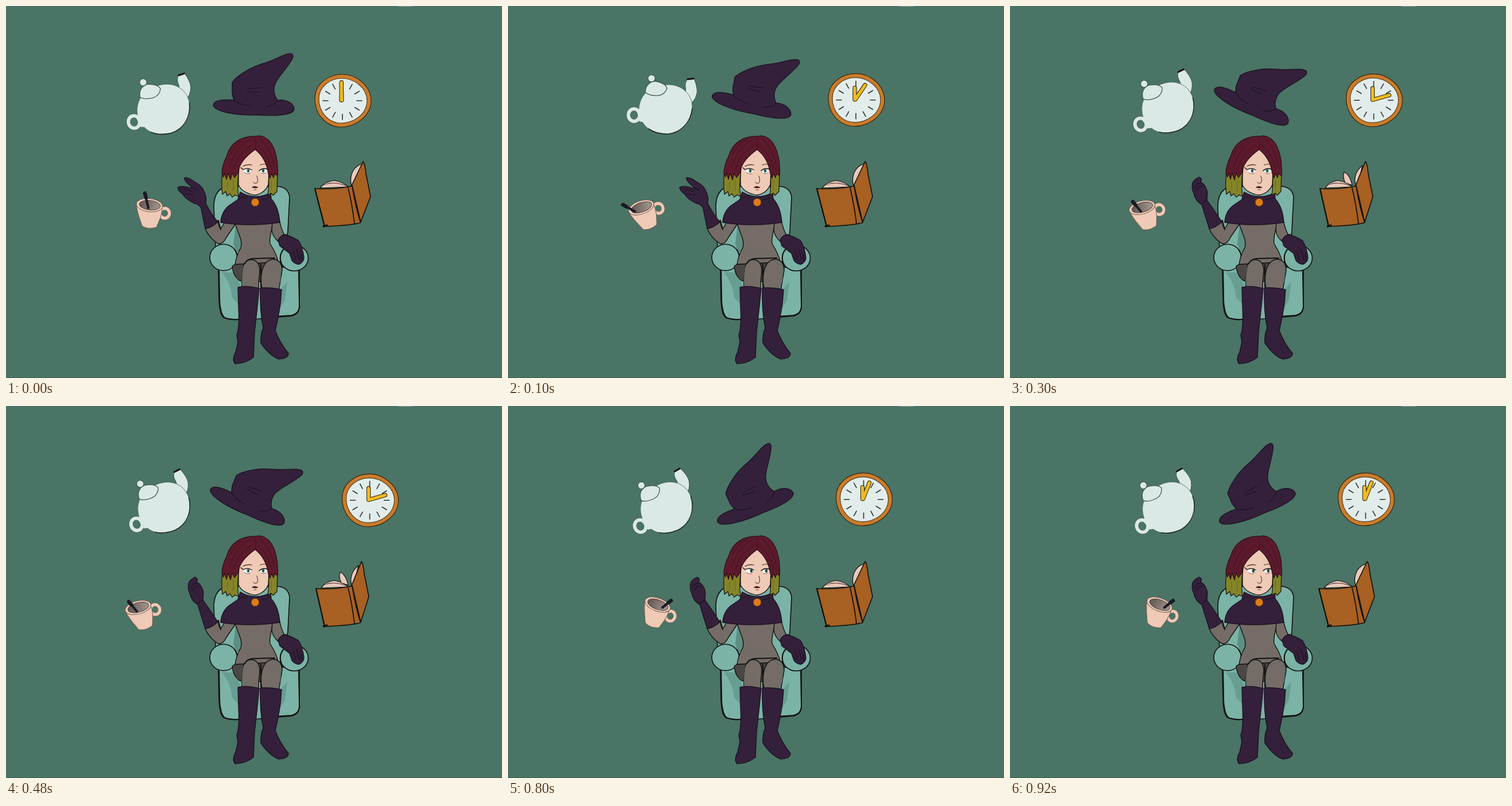
Animation of 864x648 px, one loop 1 s. Source, as an HTML page with a canvas:

```html
<!DOCTYPE html>
<html lang="en">
<head>
<meta charset="utf-8">
<title>Tea time magic</title>
<style>
html, body { margin: 0; width: 100%; height: 100%; overflow: hidden; background: #4a7465; }
canvas { display: block; }
</style>
</head>
<body>
<canvas id="stage" width="864" height="648"></canvas>
<script>
const ctx = document.getElementById('stage').getContext('2d');
const LINE = '#11110f', PLUM = '#34203a', DEEP = '#1b1220', GREY = '#756c67', MINT = '#7bb3a7',
  SHADE = '#689e91', SKIN = '#efcab6', WINE = '#5c1a2c', OLIVE = '#86842a', CHINA = '#dbe9e6', PAGE = '#e8c9bd';

// Placement of each floating thing: [x, y, degrees]; spoon: [tip x, tip y, end x, end y]
const poses = [
  { at: 0, pot: [276, 180, -12.5], hat: [431.5, 176.5, 0], clock: [587, 165], hand: [0.5, -31, 0, -29],
    cup: [250, 347, 0], spoon: [242, 326, 248, 352], arm: 'open', eyes: 'ahead', leaf: 0 },
  { at: 100, pot: [276, 180, 0], hat: [424, 173.5, 10.7], clock: [607, 163.7], hand: [0, -20, 18, -25],
    cup: [232, 351, -25], spoon: [200, 346, 221, 358], arm: 'open', eyes: 'ahead', leaf: 0 },
  { at: 300, pot: [277, 177, -20.5], hat: [420, 175, 21.8], clock: [634.6, 164.3], hand: [0, -20, 29, -8],
    cup: [230, 351, -21], spoon: [214, 341, 228, 358], arm: 'pinch', eyes: 'ahead', leaf: 1 },
  { at: 600, pot: [279, 172, -39.5], hat: [435.5, 177, 0.8], clock: [663, 163.5], hand: [3, -20, 29, 3],
    cup: [244, 346, -6], spoon: [246, 327, 246, 348], arm: 'claw', eyes: 'shut', leaf: 2 },
  { at: 800, pot: [278, 177, -24], hat: [431, 177, -23.8], clock: [620.5, 162.7], hand: [0, -20, 12, -28],
    cup: [260.5, 346, 14], spoon: [284, 339, 269, 351], arm: 'pinch', eyes: 'aside', leaf: 0 }
];

const arms = {
  open: ['M347 388L340 353Q336 344 328 344C320 340 311 334 308 328Q299 321 299 316Q305 312 321 317L324 316Q309 304 311 299Q318 298 328 306Q341 312 345 323Q350 332 348 344Q357 362 369 376Q359 386 347 388Z',
    'M304 318Q317 320 325 324M309 327Q319 328 326 329M324 316L333 321'],
  pinch: ['M347 388L334 346Q323 340 320 326Q315 316 319 306Q323 301 329 298Q336 300 332 307L336 309Q343 316 344 326L343 338Q356 356 369 376Q359 386 347 388Z',
    'M321 317Q325 309 332 308M324 322Q329 313 336 314M333 345L343 337'],
  claw: ['M347 388L334 346Q332 328 328 315Q326 304 331 303Q335 304 336 309L339 300Q343 294 346 299L346 307L350 298Q354 294 355 299L353 310L359 305Q364 305 362 311Q358 317 356 328L354 345Q359 363 369 376Q359 386 347 388Z',
    'M333 321Q345 318 356 322M334 346Q345 350 354 344M336 309L339 316M346 307L347 315']
};

function shape(d, fill, width = 1.6, stroke = LINE) {
  const p = new Path2D(d);
  if (fill) { ctx.fillStyle = fill; ctx.fill(p); }
  if (width) { ctx.strokeStyle = stroke; ctx.lineWidth = width; ctx.stroke(p); }
}

const line = (d, width = 1.4, stroke = LINE) => shape(d, null, width, stroke);

function oval(x, y, rx, ry, fill, width = 1.6, stroke = LINE, turn = 0) {
  ctx.beginPath();
  ctx.ellipse(x, y, rx, ry, turn, 0, Math.PI * 2);
  if (fill) { ctx.fillStyle = fill; ctx.fill(); }
  if (width) { ctx.strokeStyle = stroke; ctx.lineWidth = width; ctx.stroke(); }
}

// Draws with (px, py) moved to (x, y) and turned around it
function place([x, y, deg = 0], px, py, draw) {
  ctx.save();
  ctx.translate(x, y);
  ctx.rotate(deg * Math.PI / 180);
  ctx.translate(-px, -py);
  draw();
  ctx.restore();
}

function teapot() {
  const rim = '#3c5a51';
  oval(219.5, 190, 9.8, 10.8, null, 7.2, rim);
  oval(219.5, 190, 9.8, 10.8, null, 6, CHINA);
  shape('M298 158Q312 154 309 141Q308 133 313 127L324 126Q331 143 329 153Q325 168 314 173Z', CHINA, 1.1, rim);
  shape('M228 182C228 155 248 137 278 137C305 137 321 155 321 177C320 205 302 223 276 223C256 223 240 214 234 201Q227 195 228 182Z', CHINA, 0.7, rim);
  shape('M224 181L236 176L242 204L229 201Z', CHINA, 0);
  shape('M296 161L307 157L315 172L304 180Z', CHINA, 0);
  line('M321 178C318 203 302 221 278 223Q258 223 245 214', 1.6, '#1c2824');
  shape('M239 150C240 137 247 132 256 131C268 133 275 138 277 143Q274 154 262 156Q246 157 239 150Z', CHINA, 1.3, rim);
  oval(250, 126, 6.2, 6.2, CHINA, 1.2, rim);
  line('M313 127.5L323 126.5', 3);
}

function hat() {
  shape('M361 173C362 164 376 162 397 164L394 153L394 133C402 122 425 107 445 101C468 95 485 82 497 83C503 86 499 92 495 98C486 112 478 120 472 130C464 142 466 155 473 164C489 162 502 170 502 180C500 190 470 192 440 190C400 191 364 184 361 173Z', PLUM, 1.3, DEEP);
  line('M421 144L446 142M420 148Q430 150 440 150M397 164Q406 172 425 174M473 164Q469 172 453 176', 1.2, DEEP);
}

function clock({ clock: [x, y], hand: [hx, hy, mx, my] }) {
  ctx.save();
  ctx.translate(x, y);
  shape('M-49 -4C-49 -29 -26 -46 -1 -46C23 -46 49 -26 49 1C48 27 22 46 -4 46C-29 45 -49 25 -49 -4Z', '#c97c2b', 1.2, '#3a2512');
  shape('M-42 -3C-42 -25 -22 -39 -2 -39C20 -39 42 -22 42 0C41 24 19 39 -4 39C-24 39 -42 21 -42 -3Z', '#e2edeb', 1.2, '#5e4021');
  for (let i = 0; i < 12; i++) {
    const a = i * Math.PI / 6, c = Math.cos(a), s = Math.sin(a);
    line(`M${c * 25 - 1} ${s * 23.5}L${c * 34 - 1} ${s * 33}`, 1.6, '#2a3432');
  }
  ctx.translate(-3, -1);
  if (my > 0) line('M29 3L39 5', 1.3);
  const hands = `M0 0L${hx} ${hy}M1 0L${mx} ${my}`;
  line(hands, 7.4, '#33280c');
  line(hands, 5.2, '#f0bb1f');
  ctx.restore();
}

function cup() {
  const rim = '#6b574e';
  oval(26.5, 14, 8.2, 8.7, null, 6.4, rim);
  oval(26.5, 14, 8.2, 8.7, null, 5.2, SKIN);
  shape('M-23 -2C-22 12 -16 26 -13 36Q-3 43 12 38.5C17 27 22 17 22 4Z', SKIN, 1, rim);
  oval(0, 0, 23, 11.5, SKIN, 1, rim, 0.11);
  const tea = ctx.createLinearGradient(-18, -6, 18, 6);
  tea.addColorStop(0, '#5e534e');
  tea.addColorStop(1, '#a69991');
  oval(0.5, 0, 18.5, 8.3, tea, 1, '#4a403c', 0.11);
}

function spoon([x, y, ex, ey]) {
  line(`M${x} ${y}L${ex} ${ey}`, 4.2, '#1b1a24');
  line(`M${x} ${y}L${x + (ex - x) * 0.3} ${y + (ey - y) * 0.3}`, 6.4, '#1b1a24');
}

function book(leaf) {
  const dx = leaf ? 2 : 0, rx = leaf ? -3 : 0, brown = '#a86023';
  shape(`M${547 + dx} 317Q556 306 571 304Q587 306 596 315Z`, PAGE, 1.2);
  line('M553 312Q571 305 591 312M560 309Q577 306 593 314', 0.8, '#5a4038');
  if (!leaf) shape('M602 313C598 300 602 284 615 277L620 275L607 313Z', PAGE, 1.2);
  if (leaf === 1) {
    shape('M602 311C598 299 604 285 614 278L606 311Z', PAGE, 1.2);
    shape('M584 308Q579 298 582 289Q592 294 596 312Z', PAGE, 1.2);
  }
  if (leaf === 2) {
    shape('M601 309Q600 291 612 277L606 309Z', PAGE, 1.2);
    shape('M593 305Q587 290 592 276Q601 290 601 308Z', PAGE, 1.2);
  }
  shape(`M601 315L${622 + rx} 271Q${625 + rx} 273 ${627 + rx} 292L${635 + rx} 332L618 376L606 380Z`, brown, 1.6);
  shape(`M${538 + dx} 318Q566 320 597 315L603 313L618 377Q606 382 555 384Z`, brown, 1.6);
  line('M596 317Q603 346 607 379M603 314Q609 350 617 375', 1.7);
  line(`M${538 + dx} 318L555 384`, 2.2);
  line('M553 384L559 382', 3);
}

function chair() {
  shape('M365 420L362 350Q362 328 374 319Q390 312 425 315L471 314Q492 315 494 333L491 392L486 428L466 470L400 470Z', MINT);
  shape('M400 380L408 396L411 420L402 431L396 415Z', '#5d8f82', 0);
  shape('M370 455L371 510Q372 540 380 543Q392 548 440 545L497 540Q511 537 511 523L511 455Z', MINT);
  shape('M376 464Q392 484 394 508L407 522L409 488L397 464ZM480 492L490 480L486 512L474 533Z', SHADE, 0);
  line('M371 462L372 515Q374 541 383 544Q398 548 408 545', 2.3);
  line('M468 541L497 539Q512 536 511 520L510 462', 2);
  oval(379, 438, 24, 23, MINT, 1.6);
  oval(502, 439, 24.5, 22.5, MINT, 1.6);
  line('M398 424Q407 437 399 452M484 455Q473 441 482 425', 1.7);
}

function body() {
  shape('M402 448L394 453Q395 469 406 478L414 480L474 480L481 455L470 438Z', '#4c4745', 1.3);
  shape('M397 374L406 398Q412 412 409 421Q401 435 399 450Q435 448 474 446Q472 433 460 414Q458 404 467 374Z', GREY, 1.4);
  line('M404 430Q418 421 427 426M450 434L460 427', 1, '#5b716a');
  shape('M347 388Q358 386 370 373L374 388L385 370L401 378Q392 391 384 403Q378 416 369 414Q354 404 347 388Z', GREY, 1.4);
  line('M369 375Q370 382 374 390', 1.4);
  shape('M464 374L477 376Q479 388 485 399L475 411Q465 403 463 391Z', GREY, 1.4);
  shape('M474 407Q480 398 487 398Q498 402 509 408Q517 420 519 439Q518 447 510 450Q502 449 498 443L494 431L477 418Z', PLUM, 1.4, DEEP);
  line('M500 425L504 443M506 423L512 442M514 431L516 444', 1.2, DEEP);

  shape('M411 493Q409 466 414 451Q419 440 430 442Q442 445 442 462Q440 480 440 493Z', GREY, 1.4);
  shape('M446 493Q442 473 447 458Q452 442 466 441Q481 443 481 461L475 496Z', GREY, 1.4);
  line('M416 449Q419 441 430 440L468 439M444 450L444 489', 2);
  line('M411 486L411 461Q415 444 430 444M478 482L478 460Q474 445 464 445', 1, '#507568');

  shape('M404 490Q420 486 441 492L438 522L433 568L431 612Q417 623 399 623Q393 616 400 603L404 585L402 574Q407 557 405 525Z', PLUM, 1.4, DEEP);
  shape('M443 491Q460 490 480 494L478 518Q474 546 469 565Q477 587 492 605Q492 614 475 615Q459 609 444 587Q443 571 448 561Q442 532 443 491Z', PLUM, 1.4, DEEP);
}

function head(eyes) {
  shape('M408 324Q419 331 435 332Q451 332 461 324L462 336Q475 350 477 377Q424 385 374 377Q375 359 388 348L404 337Z', PLUM, 1.4, DEEP);
  line('M404 337Q413 331 421 333M460 334Q450 337 445 337', 1.2, DEEP);
  oval(434, 342, 7, 7, '#de7a18', 1, '#50300f');

  shape('M434 246Q411 260 405 286L405 312Q412 326 434 329.5Q451 326 457 311L458 286Q452 261 434 246Z', SKIN, 1.3);
  shape('M378 283Q374 306 377 328L383 323L385 331L390 327L394 333L399 329L405 332Q402 311 406 284Z', OLIVE, 1.2);
  shape('M457 285Q459 310 456 330L462 326L465 330L472 323L473 285Z', OLIVE, 1.2);
  shape('M435 227C411 226 391 238 385 260Q376 278 376 292L379 298L381 291L384 302L387 291L391 303L394 291L398 299L404 291Q406 270 434 250Q453 265 457 292L460 300L462 292L466 299L468 292L473 296C475 268 468 236 449 228Q442 225 435 227Z', WINE, 1.2, '#2b0e17');
  line('M433 229Q437 239 434 250M427 232Q400 244 389 282M429 241Q402 258 396 286M442 231Q462 245 468 284M439 243Q455 255 463 284M418 231Q398 242 390 260', 0.9, '#3a1320');
  line('M386 306L386 320M396 304L396 322M463 303L462 319', 0.9, '#66651f');

  line('M413 279Q420 275 428 277M443 277Q449 274 455 277', 1.2, '#3b2019');
  if (eyes === 'shut') {
    line('M412 285Q418 291 428 291M441 291Q449 292 456 287', 1.4);
    line('M414 290Q421 294 428 292M443 293Q449 294 454 290', 1, '#c5d8df');
    line('M410 280L414 286', 1.2);
  } else {
    shape('M413 285Q421 281 428 286Q426 291.5 420 291.5Q415 290 413 285ZM442 287Q448 282 455 286Q452 291.5 446 291.5Z', '#f6f6f2', 0);
    const aside = eyes === 'aside', x = aside ? 2 : 0;
    for (const ex of [422 + x, 448 + x]) {
      oval(ex, 287, 2.5, 3.6, aside ? '#477866' : '#4b9998', 0);
      oval(ex, 287, 1.1, 1.9, '#182526', 0);
    }
    line('M409 281.5L413 285Q420 281 428 285.5M441 287Q447 281 456 284.5', 1.4);
    line('M416 291Q421 293 425 292M445 292L452 291.5', 0.7, '#765148');
  }
  line('M437 296Q440 305 437 308Q433 310 431 307', 1.1, '#55372e');
  shape('M429 316Q432 313 435 314.5L439 316Q434 318 429 316Z', '#3d2320', 0.9, '#3d171b');
  line('M432 320L436 320', 1.1, '#5e3a34');
}

function arm(kind) {
  const [outline, folds] = arms[kind];
  shape(outline, PLUM, 1.3, DEEP);
  line(folds, 1.1, DEEP);
}

function draw(p) {
  ctx.lineCap = ctx.lineJoin = 'round';
  ctx.fillStyle = '#4a7465';
  ctx.fillRect(0, 0, 864, 648);
  ctx.fillStyle = '#91a69e';
  ctx.fillRect(683, 0, 24, 1);
  ctx.fillStyle = '#3f5f54';
  ctx.fillRect(0, 647, 864, 1);

  chair();
  body();
  head(p.eyes);
  arm(p.arm);
  place(p.pot, 276, 180, teapot);
  place(p.hat, 431.5, 176.5, hat);
  clock(p);
  place(p.cup, 0, 0, cup);
  spoon(p.spoon);
  book(p.leaf);
}

const start = performance.now();
let shown;

function tick() {
  const t = (performance.now() - start) % 1000;
  const pose = poses.filter(p => p.at <= t).pop();
  if (pose !== shown) draw(shown = pose);
  requestAnimationFrame(tick);
}

tick();
</script>
</body>
</html>
```
